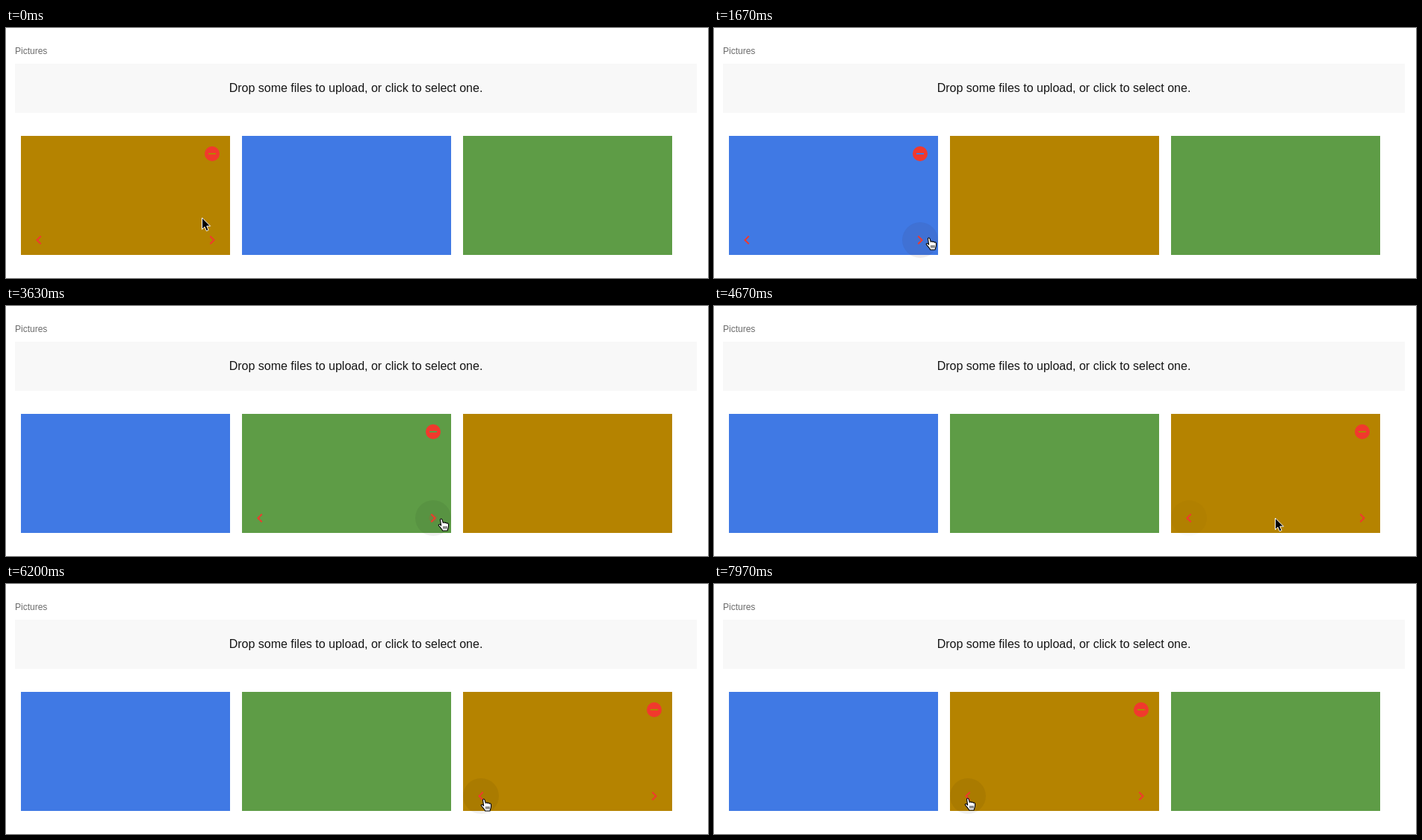
Write an HTML page that moves like this. It is 940 px wide and 336 px high and loops after 8 s.

```html
<!DOCTYPE html>
<html lang="en">
<head>
<meta charset="utf-8">
<title>Picture sorter</title>
<style>
  html, body { margin: 0; width: 100%; height: 100%; overflow: hidden; background: #fff; }
  svg { display: block; width: 940px; height: 336px; }
  text { font-family: "Liberation Sans", Arial, sans-serif; }
  .icon { fill: #f1392d; }
  .hand { fill: #fff; stroke: #000; stroke-width: 1.1; stroke-linejoin: round; }
  .crease { fill: none; stroke: #000; stroke-width: .9; }
  .arrow { fill: #000; stroke: #fff; stroke-width: 1; stroke-linejoin: round; }
</style>
</head>
<body>
<svg viewBox="0 0 940 336">
  <text x="12" y="35" font-size="12" fill="#6b6b6b">Pictures</text>
  <rect x="12" y="48" width="913" height="66" fill="#f8f8f8"/>
  <text x="468.5" y="86" font-size="16" fill="#151515" text-anchor="middle">Drop some files to upload, or click to select one.</text>

  <rect class="tile" x="20" y="145" width="280" height="160"/>
  <rect class="tile" x="316" y="145" width="280" height="160"/>
  <rect class="tile" x="612" y="145" width="280" height="160"/>

  <g id="controls">
    <circle class="halo" cx="24" cy="285" r="24"/>
    <circle class="halo" cx="256" cy="285" r="24"/>
    <circle id="ripple" cy="285" fill="#f1392d"/>
    <path class="icon" fill-rule="evenodd" d="M256 159a10 10 0 1 0 0 20a10 10 0 1 0 0-20zM251 168h10v2h-10z"/>
    <path class="icon" transform="translate(12 273)" d="M15.41 16.59 10.83 12l4.58-4.59L14 6l-6 6 6 6z"/>
    <path class="icon" transform="translate(244 273)" d="M8.59 16.59 13.17 12 8.59 7.41 10 6l6 6-6 6z"/>
  </g>

  <g id="cursor">
    <path id="arrow" class="arrow" d="M.5 0V15.6L4 12.3 6.4 17.8 9.1 16.6 6.8 11.2H11.6Z"/>
    <g id="hand">
      <path class="hand" d="M-1.5 1.2c.1-1.4 2-1.6 2.5 0l1.3 4.2c.5-.9 2.1-.9 2.5.2.6-.7 2-.6 2.4.6.8-.6 2.2-.2 2.3 1.2.1 2 .3 3.4-.5 5.2l-1 3.4h-6.4c-.6-1.7-2-3-3.2-4.6-.8-1.1-1.9-1.9-2.2-3 .1-1.3 1.6-1.2 2.5-.2l.9.9z"/>
      <path class="crease" d="M2.9 10v3.6M4.9 10v3.6M6.9 10v3.6"/>
    </g>
  </g>
</svg>
<script>
const LOOP = 8000, STEP = 296, LEFT = 24, RIGHT = 256;
const $ = id => document.getElementById(id);
const tiles = [...document.querySelectorAll('.tile')];
const halos = [...document.querySelectorAll('.halo')];

// Pointer path: time, x, y
const path = [
  [0, 262, 255], [30, 262, 255], [800, 284, 286], [1170, 284, 286],
  [1670, 288, 282], [2000, 370, 280], [2800, 582, 288], [3000, 584, 288],
  [3500, 584, 288], [3630, 583, 286], [4470, 583, 286], [4670, 751, 285],
  [4930, 805, 287], [5130, 805, 287], [5930, 640, 289], [6200, 640, 289],
  [6670, 638, 287], [7000, 638, 287], [7800, 342, 288], [7970, 340, 288], [8000, 340, 288]
];
// Presses: time, button offset, index of the left tile of the swapped pair
const presses = [[1170, RIGHT, 0], [3500, RIGHT, 1], [6170, LEFT, 1]];
const HOLD = 100, RIPPLE = 550;

const clamp = v => Math.min(1, Math.max(0, v));
const smooth = v => (v = clamp(v)) * v * (3 - 2 * v);
const slope = (i, k) => path[i] && path[i + 1]
  ? (path[i + 1][k] - path[i][k]) / (path[i + 1][0] - path[i][0]) : 0;

// Harmonic mean keeps the curve free of overshoot
function tangent(i, k) {
  const a = slope(i - 1, k), b = slope(i, k);
  return a * b > 0 ? 2 * a * b / (a + b) : 0;
}

function pointer(t) {
  let i = 0;
  while (i < path.length - 2 && path[i + 1][0] <= t) i++;
  const [p, q] = [path[i], path[i + 1]], d = q[0] - p[0], u = (t - p[0]) / d;
  return [1, 2].map(k => {
    const s = smooth(u);
    return p[k] * (1 - s) + q[k] * s
      + d * u * (1 - u) * ((1 - u) * tangent(i, k) - u * tangent(i + 1, k));
  });
}

function hover(t) {
  const [x, y] = pointer(t);
  const tile = [0, 1, 2].find(n => x >= 20 + n * STEP && x < 300 + n * STEP);
  const button = tile === undefined ? undefined
    : [LEFT, RIGHT].find(b => Math.hypot(x - 20 - tile * STEP - b, y - 285) < 24);
  return { x, y, tile, button };
}

function draw(t) {
  const { x, y, tile, button } = hover(t);

  const colors = ['#b58300', '#4079e4', '#5e9c46'];
  for (const [at, , n] of presses)
    if (t >= at + HOLD) [colors[n], colors[n + 1]] = [colors[n + 1], colors[n]];
  tiles.forEach((el, i) => el.setAttribute('fill', colors[i]));

  $('controls').style.display = tile === undefined ? 'none' : '';
  if (tile !== undefined) $('controls').setAttribute('transform', `translate(${20 + tile * STEP} 0)`);

  // Halo fades over 150 ms of hovering
  [LEFT, RIGHT].forEach((b, i) => {
    let sum = 0;
    for (let k = 0; k < 6; k++) {
      const h = hover(Math.max(0, t - k * 25));
      if (h.tile === tile && h.button === b) sum++;
    }
    halos[i].setAttribute('fill-opacity', 0.06 * sum / 6);
  });

  const press = presses.find(([at]) => t >= at && t < at + HOLD + RIPPLE);
  $('ripple').style.display = press ? '' : 'none';
  if (press) {
    const age = t - press[0];
    $('ripple').setAttribute('cx', press[1]);
    $('ripple').setAttribute('r', 24 * smooth((age / RIPPLE) ** 0.8));
    $('ripple').setAttribute('fill-opacity',
      (0.1 + 0.2 * smooth(age / RIPPLE)) * (1 - smooth((age - HOLD) / RIPPLE * 1.15)));
  }

  $('cursor').setAttribute('transform', `translate(${Math.round(x)} ${Math.round(y)})`);
  $('hand').style.display = button === undefined ? 'none' : '';
  $('arrow').style.display = button === undefined ? '' : 'none';
}

const start = performance.now();
function tick() {
  draw((performance.now() - start) % LOOP);
  requestAnimationFrame(tick);
}
tick();
</script>
</body>
</html>
```
